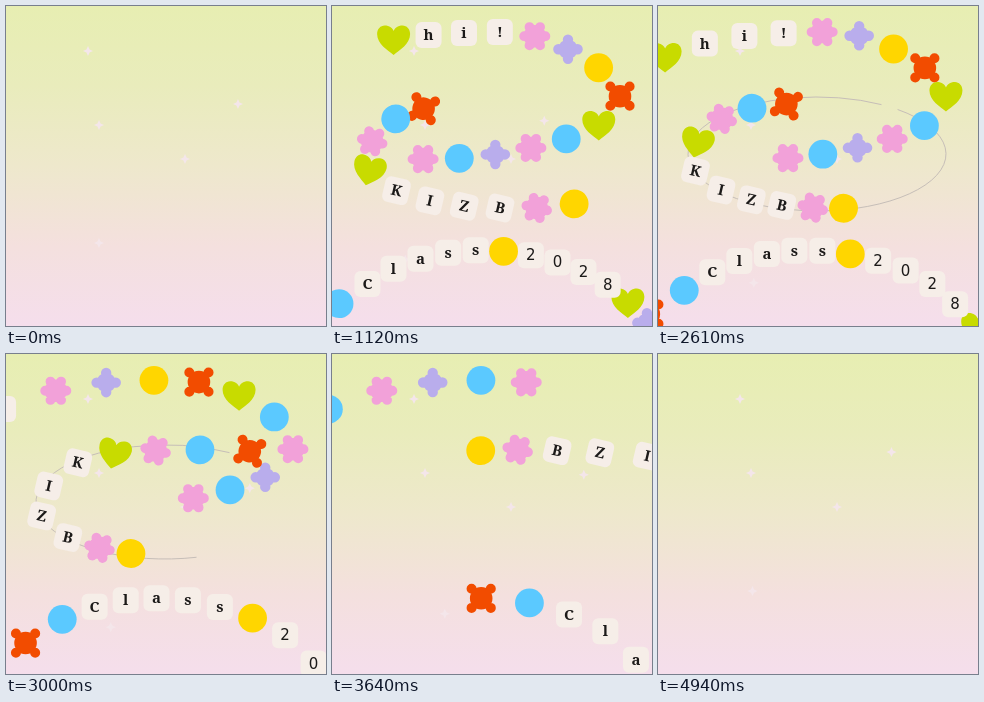
Write an HTML page with a canvas that moves like this. It is 320x320 px and loops after 5000 ms.

```html
<!DOCTYPE html>
<html lang="en">
<head>
<meta charset="utf-8">
<title>Charm strands</title>
<style>
  html, body { margin: 0; width: 100%; height: 100%; overflow: hidden; }
  canvas { display: block; width: 100vw; height: 100vh; }
</style>
</head>
<body>
<canvas></canvas>
<script>
const SIZE = 320, LOOP = 5, TAU = Math.PI * 2;
const canvas = document.querySelector('canvas');
const ctx = canvas.getContext('2d');
const smooth = (a, b, t) => {
  const u = Math.min(1, Math.max(0, (t - a) / (b - a)));
  return u * u * (3 - 2 * u);
};

// Smooth curve through key points, measured by chord length and extended straight at both ends.
function makeCurve(...points) {
  const last = points.length - 1, at = [0];
  for (let i = 1; i <= last; i++)
    at[i] = at[i - 1] + Math.hypot(points[i][0] - points[i - 1][0], points[i][1] - points[i - 1][1]);
  const slopes = points.map((_, i) => {
    const a = Math.max(0, i - 1), b = Math.min(last, i + 1);
    return [0, 1].map(k => (points[b][k] - points[a][k]) / (at[b] - at[a]));
  });
  const extend = (i, s) => points[i].map((p, k) => p + slopes[i][k] * (s - at[i]));
  return s => {
    if (s <= 0) return extend(0, s);
    if (s >= at[last]) return extend(last, s);
    let i = 0;
    while (at[i + 1] < s) i++;
    const h = at[i + 1] - at[i], u = (s - at[i]) / h, v = 1 - u;
    return [0, 1].map(k =>
      points[i][k] * v * v * (1 + 2 * u) + points[i + 1][k] * u * u * (3 - 2 * u) +
      slopes[i][k] * h * u * v * v - slopes[i + 1][k] * h * u * u * v);
  };
}

// A disc with a ring of round lobes
function lobed(body, count = 0, reach = 0, lobe = 0, turn = 0) {
  const path = new Path2D();
  path.arc(0, 0, body, 0, TAU);
  for (let i = 0; i < count; i++) {
    const a = turn + i / count * TAU, x = reach * Math.cos(a), y = reach * Math.sin(a);
    path.moveTo(x + lobe, y);
    path.arc(x, y, lobe, 0, TAU);
  }
  return path;
}

const shapes = {
  yellow: ['#ffd600', lobed(14.4)],
  blue: ['#5bc9ff', lobed(14.4)],
  flower: ['#f2a1d9', lobed(11.3, 6, 10.6, 4.9)],
  clover: ['#b9adec', lobed(9.8, 4, 9.6, 5.2)],
  cross: ['#f24c00', lobed(11.3, 4, 13.6, 5, TAU / 8)],
  heart: ['#c8db00', new Path2D('M0 15C-6 10-16.5 4-16.5-6C-16.5-11-13-14.5-9-14.5C-4-14.5-1-12-0-9C1-12 4-14.5 9-14.5C13-14.5 16.5-11 16.5-6C16.5 4 6 10 0 15Z')]
};
const tile = new Path2D();
tile.roundRect(-13, -13, 26, 26, 6);

// Beads run from the leading one backwards. "rest" is where bead i lingers,
// "lag" its delay on arrival and "exit" how far it pulls away when leaving.
const strands = [
  {
    beads: 'heart h i ! flower clover yellow cross heart blue flower clover blue flower',
    tilt: 0, middle: .67, travel: 606,
    rest: i => 567 - 34.55 * i,
    lag: i => .0075 * i,
    exit: i => 59 + 197 * Math.exp(-.24 * i),
    curve: makeCurve([1, 140], [88, 153], [178, 146], [264, 121], [288, 90],
      [267, 62], [202, 30], [130, 27], [61, 34], [3, 53])
  },
  {
    beads: 'cross blue flower heart K I Z B flower yellow',
    tilt: 13, middle: .67, travel: 630,
    rest: i => 385 - 30.5 * i,
    lag: i => .022 * Math.max(0, i - 2),
    exit: i => 67 + 68 * Math.exp(-.32 * i),
    curve: makeCurve([306, 180], [236, 199], [168, 202], [103, 196], [48, 176],
      [33, 149], [69, 110], [143, 97], [237, 97], [298, 101])
  },
  {
    beads: 'clover heart 8 2 0 2 yellow s s a l C blue cross',
    tilt: 0, middle: .614, travel: 437,
    rest: i => 353 - 26.8 * i - 25 * (i / 13) ** 12,
    lag: i => .0108 * i,
    exit: i => 36 + 162 * Math.exp(-.28 * i),
    curve: makeCurve([2, 301], [63, 262], [122, 246], [179, 246], [227, 257], [276, 279], [311, 313])
  }
];

function drawBackground() {
  const g = ctx.createLinearGradient(0, 0, 0, SIZE);
  ['#e7eeb2', '#e9ecbc', '#eee8cc', '#f4e0de', '#f5deec']
    .forEach((color, i, all) => g.addColorStop(i / (all.length - 1), color));
  ctx.fillStyle = g;
  ctx.fillRect(0, 0, SIZE, SIZE);
}

function drawStar(x, y) {
  const r = 5, waist = 1.6;
  ctx.beginPath();
  for (let i = 0; i < 8; i++) {
    const a = i / 8 * TAU, d = i % 2 ? waist * 1.4 : r;
    ctx.lineTo(x + d * Math.cos(a), y + d * Math.sin(a));
  }
  ctx.fillStyle = '#f4e6ea';
  ctx.fill();
}

function drawStars(t) {
  [[82, 45], [93, 119], [179, 153]].forEach(([x, y]) => drawStar(x, y));
  const a = -TAU / 4 - t / LOOP * TAU;
  [[232, 118], [93, 257]].forEach(([x, y]) => drawStar(x + 20 * Math.cos(a), y + 20 * Math.sin(a)));
}

function drawThread(t) {
  const start = -TAU / 6;
  const from = smooth(2.5, 3.7, t), to = smooth(1.12, 1.85, t);
  if (to <= from) return;
  ctx.beginPath();
  ctx.ellipse(159, 148, 129, 57, 0, start + from * TAU, start + to * TAU);
  ctx.strokeStyle = '#c6beb8';
  ctx.lineWidth = 1;
  ctx.stroke();
}

function drawBead(kind, x, y, tilt) {
  ctx.save();
  ctx.translate(x, y);
  ctx.rotate(tilt * TAU / 360);
  const [color, path] = shapes[kind] || ['#f6eee8', tile];
  ctx.fillStyle = color;
  ctx.fill(path);
  if (path === tile) {
    ctx.fillStyle = '#1c1a19';
    ctx.font = /\d/.test(kind) ? '15px "DejaVu Sans", sans-serif' : '600 15px "Noto Serif", serif';
    ctx.fillText(kind, 0, 5);
  }
  ctx.restore();
}

function drawStrand({ beads, tilt, middle, travel, rest, lag, exit, curve }, t) {
  // Eases from standstill into constant speed
  const leaving = 1.134 * Math.log(1 + Math.exp((t - 2.93) / .18));
  beads.split(' ').forEach((kind, i) => {
    const remaining = travel / (1 + Math.exp((t - middle - lag(i)) / .115));
    const [x, y] = curve(rest(i) - remaining + exit(i) * leaving);
    drawBead(kind, x, y, tilt);
  });
}

function draw(now) {
  const t = now / 1000 % LOOP;
  const w = Math.round(innerWidth * devicePixelRatio), h = Math.round(innerHeight * devicePixelRatio);
  if (canvas.width !== w || canvas.height !== h) { canvas.width = w; canvas.height = h; }
  ctx.setTransform(w / SIZE, 0, 0, h / SIZE, 0, 0);
  ctx.textAlign = 'center';
  drawBackground();
  drawStars(t);
  drawThread(t);
  strands.forEach(strand => drawStrand(strand, t));
  requestAnimationFrame(draw);
}
requestAnimationFrame(draw);
</script>
</body>
</html>
```
